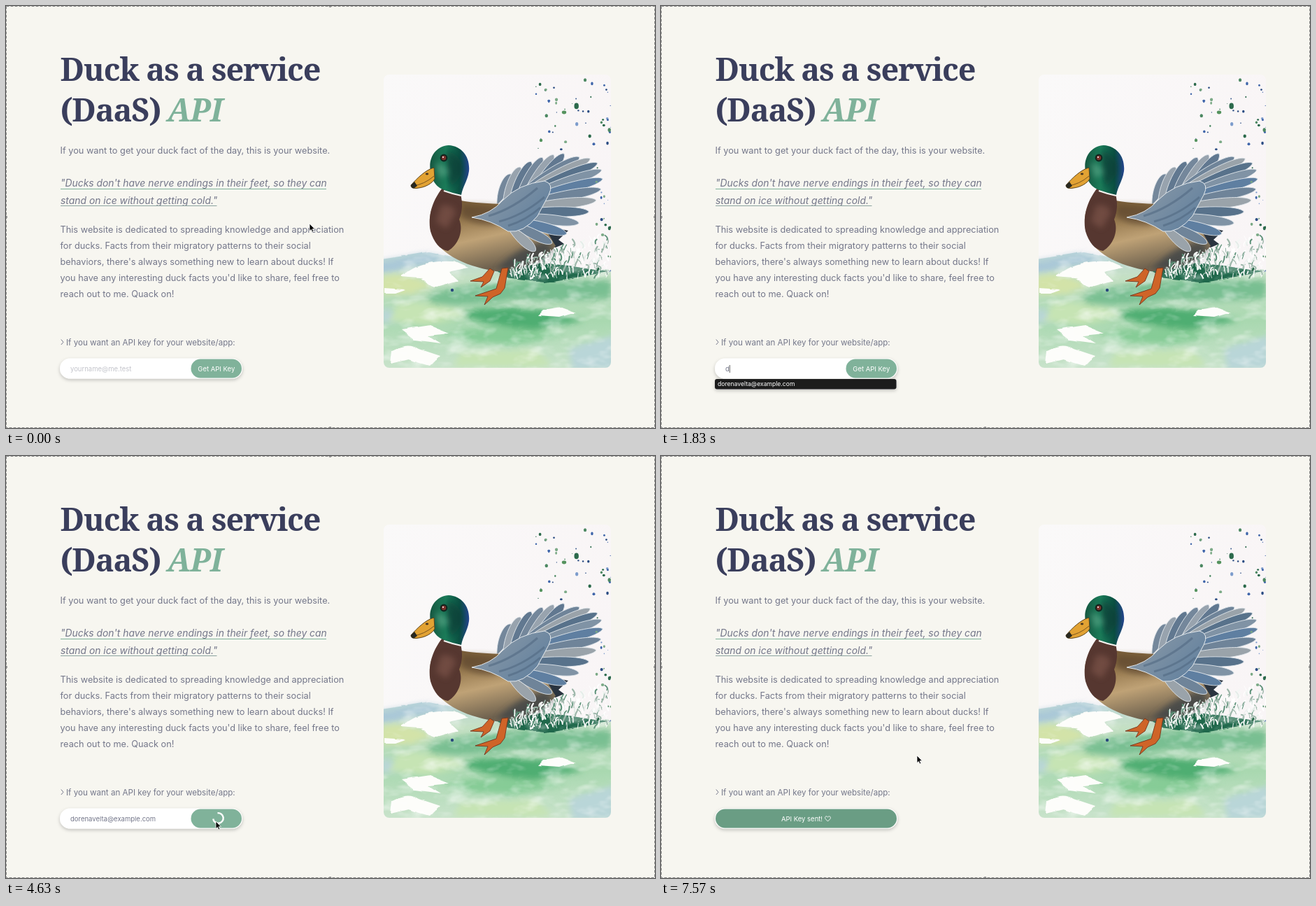
An HTML page that plays this animation: 928 by 603 pixels, repeating every 8 s.

```html
<!DOCTYPE html>
<html lang="en">
<head>
<meta charset="utf-8">
<title>Duck as a service</title>
<style>
html, body { margin: 0; width: 100%; height: 100%; overflow: hidden; background: #f7f6f0; }
svg { position: absolute; left: 0; top: 0; width: 928px; height: 603px; }
#painting { will-change: transform; }
text { font-family: Inter, sans-serif; font-size: 12.76px; fill: #74778a; white-space: pre; }
.title { font: bold 45px "Noto Serif", serif; letter-spacing: -.026em; fill: #3a3e5c; }
.title .api { font-style: italic; fill: #7fb29a; }
.quote { font-size: 13.9px; font-style: italic; }
.label { font-size: 11.6px; }
.small { font-size: 9.5px; }
.white { fill: #fff; text-anchor: middle; }
</style>
</head>
<body>
<svg id="painting" viewBox="0 0 928 603">
  <defs>
    <clipPath id="card"><rect x="540" y="98" width="325" height="419" rx="8"/></clipPath>
    <filter id="wash" filterUnits="userSpaceOnUse" x="530" y="90" width="345" height="435" color-interpolation-filters="sRGB">
      <feTurbulence type="fractalNoise" baseFrequency=".03 .06" numOctaves="3" seed="4" result="noise"/>
      <feDisplacementMap in="SourceGraphic" in2="noise" scale="5" xChannelSelector="R" yChannelSelector="G" result="shape"/>
      <feColorMatrix in="noise" values="0 0 0 0 1  0 0 0 0 1  0 0 0 0 1  1.2 0 0 0 -.56"/>
      <feComposite in2="shape" operator="in" result="bloom"/>
      <feMerge><feMergeNode in="shape"/><feMergeNode in="bloom"/></feMerge>
    </filter>
    <filter id="soft" x="-30%" y="-30%" width="160%" height="160%"><feGaussianBlur stdDeviation="4"/></filter>
    <linearGradient id="sky" x2="1" y2=".4"><stop stop-color="#faf9f9"/><stop offset="1" stop-color="#f9f5f6"/></linearGradient>
    <linearGradient id="water" x2="0" y2="1">
      <stop stop-color="#bcd6dc"/><stop offset=".2" stop-color="#c5e0c4"/>
      <stop offset=".55" stop-color="#a9d8b0"/><stop offset="1" stop-color="#cfe5d0"/>
    </linearGradient>
    <linearGradient id="body" x2=".35" y2="1">
      <stop stop-color="#644a30"/><stop offset=".3" stop-color="#86693f"/>
      <stop offset=".65" stop-color="#bfa276"/><stop offset="1" stop-color="#6f624f"/>
    </linearGradient>
    <linearGradient id="head">
      <stop stop-color="#14553f"/><stop offset=".4" stop-color="#1b7d5a"/>
      <stop offset=".75" stop-color="#0b5042"/><stop offset="1" stop-color="#24458e"/>
    </linearGradient>
    <linearGradient id="covert" x2="1" y2=".6"><stop stop-color="#8b857f"/><stop offset=".4" stop-color="#7f92a4"/><stop offset="1" stop-color="#64829f"/></linearGradient>
  </defs>
  <g clip-path="url(#card)">
    <rect x="540" y="98" width="325" height="419" fill="url(#sky)"/>
    <g filter="url(#wash)">
      <path fill="url(#water)" d="M530 363Q570 357 605 351Q650 360 700 372L875 378V530H530Z"/>
      <g filter="url(#soft)">
        <path fill="#a9c7d8" d="M530 366L605 354L640 362L575 372L530 384Z"/>
        <path fill="#d3e3a8" d="M535 388Q575 378 610 400L580 412L535 410Z"/>
        <path fill="#79bf92" d="M605 412Q690 385 865 392V418Q780 424 730 420Q670 430 605 424Z"/>
        <path fill="#4fae72" d="M640 440Q700 425 770 435L825 450L750 463L690 455Z"/>
        <path fill="#86cc96" d="M625 470Q700 448 800 470L730 484L660 480Z"/>
        <path fill="#b9d6d8" d="M805 490L870 470V520H810ZM535 432L590 436L560 454H535Z"/>
        <path fill="#c6e4b4" d="M560 425Q620 420 660 442L600 456L545 450ZM650 495L760 492L780 515H640Z"/>
      </g>
      <path fill="#fdfdfa" d="M578 377Q600 363 640 365L660 374L634 380L647 392L612 402L592 388L562 386ZM566 463L606 457L633 468L604 471L622 482L584 477ZM552 492Q575 480 590 490L620 500L606 514L575 505L550 511ZM768 435L795 431L815 438L792 445L760 443ZM540 403L570 405L556 410H540Z"/>
      <path fill="#1f684b" d="M700 379Q745 364 805 371L862 380L815 388L770 395L722 390Z"/>
    </g>
    <g id="farWing"></g>
    <path fill="#2a3440" d="M755 318L785 317L804 321L790 334L798 340L755 358Z"/>
    <path fill="url(#body)" d="M630 265C606 278 602 306 609 326C618 352 652 371 700 379C740 378 770 362 786 343L760 300C735 277 690 286 650 278Z"/>
    <path fill="#3f4547" opacity=".8" filter="url(#soft)" d="M702 376Q735 340 778 335L780 354Q745 382 702 376Z"/>
    <path fill="#5b452d" opacity=".7" filter="url(#soft)" d="M652 284Q695 283 730 290L700 312Q670 314 650 300Z"/>
    <path fill="#563730" d="M628 255C609 277 603 300 607 322C612 338 620 348 632 350C646 342 655 322 648 305C653 292 653 282 650 268Z"/>
    <path fill="#82584e" opacity=".6" filter="url(#soft)" d="M622 285Q640 282 643 296L630 318L615 308Z"/>
    <g id="nearWing"></g>
    <path fill="url(#covert)" stroke="#e3e8ec" d="M666 302Q694 297 710 278Q733 254 770 250Q784 254 776 270L760 300Q740 325 718 322Q694 306 666 302Z"/>
    <path fill="none" stroke="#4f6780" stroke-width="3" opacity=".55" d="M690 300Q725 290 760 260M705 308Q738 300 770 273M718 314Q744 306 764 288"/>
    <g fill="#cf6428" stroke="#74351d" stroke-width=".9">
      <path d="M692 375L681 387L664 393L683 394L679 402L692 393L698 379Z"/>
      <path d="M718 374L713 403L707 411L696 416L684 427L689 415L671 414L701 404L709 375Z"/>
    </g>
    <path fill="url(#head)" d="M607 237C603 215 616 200 633 199C652 200 664 216 662 236C660 250 653 258 651 270Q638 269 627 263C616 260 609 250 607 237Z"/>
    <path fill="#0b3b35" opacity=".65" filter="url(#soft)" d="M630 206Q657 216 652 240L637 260L630 238Z"/>
    <path fill="#6fb99a" opacity=".5" filter="url(#soft)" d="M614 225Q630 224 633 240L620 246Z"/>
    <path fill="none" stroke="#f4f3f0" stroke-width="2.2" d="M626 264Q637 268 651 271"/>
    <path fill="#e2a233" stroke="#5b431d" d="M612 231C600 234 588 246 579 256C579 261 585 261 590 260C599 259 609 254 613 247Z"/>
    <path fill="none" stroke="#7a5521" d="M582 257Q598 255 612 243"/>
    <path fill="#282820" d="M584 251L579 256Q579 261 584 260L588 257Z"/>
    <ellipse cx="602" cy="240" rx="2.2" ry="1.4" fill="#4b3820"/>
    <circle cx="626" cy="217" r="5.4" fill="#14251f"/>
    <circle cx="626" cy="217" r="3.2" fill="#7c312c"/>
    <circle cx="625" cy="216" r="1" fill="#fff"/>
    <g id="splash"></g>
    <circle cx="638" cy="406" r="2.2" fill="#28477c"/>
  </g>
</svg>

<svg viewBox="0 0 928 603">
  <defs><filter id="shadow" x="-10%" y="-30%" width="120%" height="190%">
    <feDropShadow dx="0" dy="2" stdDeviation="2.5" flood-opacity=".22"/>
  </filter></defs>
  <rect x=".5" y=".5" width="927" height="602" fill="none" stroke="#858585" stroke-dasharray="4 2"/>
  <g fill="#888"><circle cx="463.5" cy="0" r="2"/><circle cx="0" cy="301.5" r="2"/><circle cx="463.5" cy="603" r="2"/><circle cx="928" cy="301.5" r="2"/></g>

  <text class="title" x="77.5" y="107">Duck as a service</text>
  <text class="title" x="77.5" y="164.5">(DaaS)</text>
  <text class="title" x="230.5" y="164.5"><tspan class="api">API</tspan></text>
  <text x="77.5" y="210.5">If you want to get your duck fact of the day, this is your website.</text>
  <text class="quote" x="78" y="258">"Ducks don't have nerve endings in their feet, so they can</text>
  <text class="quote" x="78" y="283">stand on ice without getting cold."</text>
  <path d="M78 261.5H458" stroke="#7fb29a"/>
  <path d="M78 285.5H301.5" stroke="#8ba39f"/>
  <g id="about"></g>
  <path d="M78.8 476.5L82 480.3L78.8 484" fill="none" stroke="#74778a"/>
  <text class="label" x="86" y="484.5">If you want an API key for your website/app:</text>

  <rect x="77" y="503.5" width="261" height="29" rx="14.5" fill="#fff" filter="url(#shadow)"/>
  <text class="small" id="value" x="92" y="522"></text>
  <rect id="caret" y="513" width="1" height="11" fill="#666"/>
  <rect id="button" y="504.5" height="27" rx="13.5"/>
  <text class="small white" id="action" x="300.8" y="522">Get API Key</text>
  <path id="spinner" d="M5.2 -5.2A7.3 7.3 0 1 0 5.2 5.2" fill="none" stroke="#fff" stroke-width="2.4"/>
  <g id="sent">
    <text class="small white" x="201.5" y="522">API Key sent!</text>
    <path d="M238.5 522L235 518.3C233.5 515.5 236.5 513.6 238.5 516C240.5 513.6 243.5 515.5 242 518.3Z" fill="none" stroke="#fff" stroke-width=".9"/>
  </g>
  <g id="hint" filter="url(#shadow)">
    <rect x="77" y="533" width="259.5" height="14.5" rx="3" fill="#1d1d1e"/>
    <text x="81" y="543.3" style="font-size:8.6px;fill:#fff" id="hintText"></text>
  </g>
  <path id="cursor" d="M0 0V10.6L2.4 8.4L4 12L5.8 11.2L4.2 7.7H7.5Z" stroke="#fff" stroke-width=".8"/>
</svg>

<script>
const $ = id => document.getElementById(id);
const LOOP = 8000, EMAIL = "dorenavelta@example.com", PLACEHOLDER = "yourname@me.test";
const TYPE = 1700, FILL = 3030, LOADING = 4450, SENT = 7170;
const PATH = [
  [150, 434, 311], [1250, 186, 516], [3570, 188, 516], [4000, 300, 522],
  [4950, 300, 522], [5370, 338, 497], [5850, 366, 428]
];

const clamp = p => Math.max(0, Math.min(1, p));
const smooth = p => (p = clamp(p), p * p * (3 - 2 * p));
const mix = (a, b, p) => a + (b - a) * p;

let seed = 7;
const random = () => (seed = (seed * 16807) % 2147483647) / 2147483647;
const between = (a, b) => mix(a, b, random());
const pick = list => list[Math.floor(random() * list.length)];

$("about").innerHTML = [
  "This website is dedicated to spreading knowledge and appreciation",
  "for ducks. Facts from their migratory patterns to their social",
  "behaviors, there's always something new to learn about ducks! If",
  "you have any interesting duck facts you'd like to share, feel free to",
  "reach out to me. Quack on!"
].map((line, i) => `<text x="77.5" y="${323.7 + 23 * i}">${line}</text>`).join("");
$("hintText").textContent = EMAIL;

function feather(bx, by, tx, ty, width, fill) {
  const dx = tx - bx, dy = ty - by, len = Math.hypot(dx, dy);
  const at = (p, side) => `${bx + dx * p - dy / len * width * side} ${by + dy * p + dx / len * width * side}`;
  return `<path fill="${fill}" stroke="#e3e8ec" stroke-width=".9" d="M${bx} ${by}C${at(.4, -1)} ${at(.95, -1)} ${tx} ${ty}C${at(.95, 1)} ${at(.4, 1)} ${bx} ${by}"/>`;
}

function wing(count, base, tips, width, tones) {
  const curve = (p, [a, b, c, d]) =>
    a * (1 - p) ** 3 + 3 * b * p * (1 - p) ** 2 + 3 * c * p * p * (1 - p) + d * p ** 3;
  let out = "";
  for (let i = 0; i < count; i++) {
    const p = i / (count - 1);
    out += feather(mix(base[0], base[2], p), mix(base[1], base[3], p),
      curve(p, tips[0]), curve(p, tips[1]), width, tones[i % tones.length]);
  }
  return out;
}

$("farWing").innerHTML = wing(6, [702, 284, 745, 275],
  [[722, 742, 775, 798], [240, 222, 212, 211]], 10, ["#74879b", "#98a3ae", "#617890"]);
$("nearWing").innerHTML = wing(12, [738, 262, 715, 312],
  [[820, 885, 850, 757], [216, 215, 315, 350]], 9.5, ["#6f8499", "#9aa3aa", "#58728b", "#8093a5", "#5f7fa1"]);

function splash() {
  const blues = ["#3f65aa", "#2c4d83", "#7d9ccc"], greens = ["#4c8862", "#7ba986", "#2c6a4c"];
  let out = "";
  for (let i = 0; i < 125; i++) {
    const x = 865 - 108 * random() ** 1.5, y = between(105, 380), r = between(.5, 2.3) * (i % 9 ? 1 : 1.5);
    if (y > 205 && x < 843) continue;
    out += `<ellipse cx="${x}" cy="${y}" rx="${r}" ry="${r * between(.8, 1.4)}" fill="${pick(random() < .65 ? blues : greens)}"/>`;
  }
  out += '<ellipse cx="798" cy="152" rx="3.2" ry="2.4" fill="#55935e"/><circle cx="765" cy="192" r="2.2" fill="#55935e"/>';
  for (let i = 0; i < 260; i++) {
    const x = between(722, 865), y = between(390, mix(370, 325, (x - 722) / 143));
    const color = pick(["#fff", "#f4f8f5", "#fff", "#e4ece8", "#9db7aa", "#5b9077"]);
    out += `<path d="M${x} ${y}q${between(-3, 3)} -4 ${between(-4, 5)} ${between(-10, -3)}" fill="none" stroke="${color}" stroke-width="${between(.7, 2.3)}" stroke-linecap="round"/>`;
  }
  return out;
}
$("splash").innerHTML = splash();

function cursorAt(t) {
  const next = PATH.findIndex(key => key[0] > t);
  if (next < 1) return (next ? PATH[PATH.length - 1] : PATH[0]).slice(1);
  const a = PATH[next - 1], b = PATH[next], p = smooth((t - a[0]) / (b[0] - a[0]));
  return [mix(a[1], b[1], p), mix(a[2], b[2], p)];
}

const show = (id, opacity) => $(id).setAttribute("opacity", Number(opacity));

function render(t) {
  const typed = t < FILL ? Math.min(12, Math.max(0, Math.floor((t - TYPE) / 88))) : EMAIL.length;
  const value = $("value");
  value.textContent = typed ? EMAIL.slice(0, typed) : PLACEHOLDER;
  value.style.fill = typed ? "#74778a" : "#c3c4cb";
  $("caret").setAttribute("x", 92 + (typed ? value.getComputedTextLength() : 0));
  show("caret", t >= 1330 && t < LOADING && !(t >= 3430 && t < 3770));
  show("hint", typed ? 1 - clamp((t - FILL) / 240) : 0);

  const grow = smooth((t - SENT) / 400), left = mix(264.5, 78, grow);
  $("button").setAttribute("x", left);
  $("button").setAttribute("width", 337 - left);
  $("button").style.fill = `color-mix(in srgb, #6a9d84 ${grow * 100}%, #80b29a)`;
  show("action", t < LOADING);
  show("spinner", t >= LOADING && t < SENT);
  show("sent", grow);
  $("spinner").setAttribute("transform", `translate(303.5 517.5) rotate(${190 + (t - 5370) * .45})`);

  $("cursor").setAttribute("transform", `translate(${cursorAt(t)})`);
  show("cursor", t < TYPE + 88 || t >= 3570);
}

const start = performance.now();
(function frame() {
  render((performance.now() - start) % LOOP);
  requestAnimationFrame(frame);
})();
</script>
</body>
</html>
```
